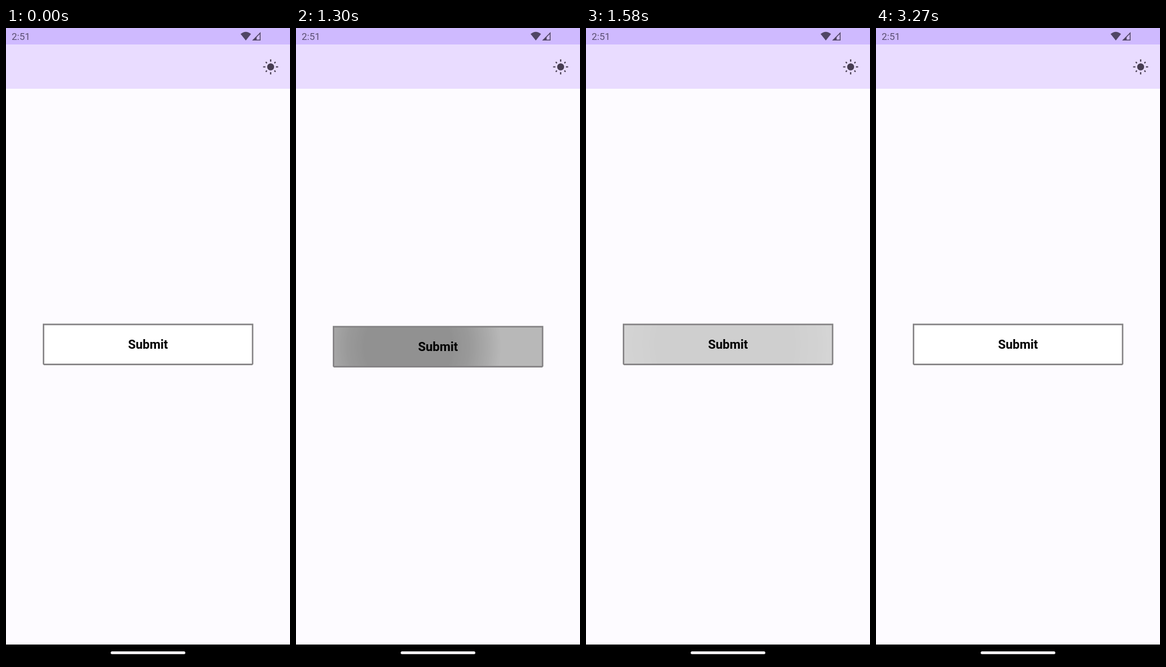
Write an HTML page that moves like this. It is 502 px wide and 1115 px high and loops after 3330 ms.

```html
<!DOCTYPE html>
<html lang="en">
<head>
<meta charset="utf-8">
<title>Submit button</title>
<style>
  html, body { margin: 0; width: 100%; height: 100%; overflow: hidden; background: #fdfbff; }
  svg { display: block; width: 502px; height: 1115px; font-family: Roboto, sans-serif; }
  .button, .ink, .ripple { animation: 3330ms linear infinite; }
  .button { animation-name: press; }
  .ink { animation-name: fade; }
  .ripple { animation-name: spread; }

  /* Touch down at 1190 ms, release at 1390 ms */
  @keyframes press {
    0%, 35.74% { transform: translateY(0); }
    37.84%, 41.74% { transform: translateY(4px); }
    43.54% { transform: translateY(3px); }
    46.85%, 100% { transform: translateY(0); }
  }
  @keyframes fade {
    0%, 35.74% { opacity: 0; }
    37.84%, 41.74% { opacity: 1; }
    43.54% { opacity: .82; }
    47.45% { opacity: .44; }
    50.75%, 100% { opacity: 0; }
  }
  @keyframes spread {
    0%, 35.74% { transform: translate(180px, 557px) scale(50); }
    39.04% { transform: translate(198px, 557px) scale(165); }
    43.24%, 100% { transform: translate(246px, 557px) scale(260); }
  }
</style>
</head>
<body>
<svg viewBox="0 0 502 1115">
  <defs>
    <radialGradient id="glow">
      <stop offset=".48" stop-opacity=".21"/>
      <stop offset=".65" stop-opacity=".17"/>
      <stop offset=".85" stop-opacity=".08"/>
      <stop offset="1" stop-opacity="0"/>
    </radialGradient>
    <clipPath id="face"><rect x="66" y="522" width="370" height="71"/></clipPath>
  </defs>

  <rect width="502" height="1115" fill="#fdfbff"/>
  <rect width="502" height="107" fill="#e9dcff"/>
  <rect width="502" height="29" fill="#cfbaff"/>

  <text x="10" y="21.3" font-size="17" fill="#5a4e70">2:51</text>
  <g fill="#514664">
    <path d="M414.7 10.6Q423.9 3 433.1 10.6L423.9 22Z"/>
    <path d="M435 22L450 7V22ZM443 20.5H448.5V10.7L443 16.2Z" fill-rule="evenodd"/>
  </g>

  <g transform="translate(467.8 68.5)" fill="#473d51" stroke="#473d51" stroke-width="2.2">
    <circle r="6.2" stroke="none"/>
    <path d="M0-13.3V-9.2M0 9.2V13.3M-13.3 0H-9.2M9.2 0H13.3"/>
    <path d="M0-12.2V-9.3M0 9.3V12.2M-12.2 0H-9.3M9.3 0H12.2" transform="rotate(45)"/>
  </g>

  <g class="button">
    <rect x="66" y="522" width="370" height="71" fill="#fff"/>
    <g clip-path="url(#face)">
      <g class="ink">
        <rect x="66" y="522" width="370" height="71" fill-opacity=".28"/>
        <circle class="ripple" r="1" fill="url(#glow)"/>
      </g>
    </g>
    <path d="M65 520.8H437.2V592L435.2 594H67L65 592ZM67.6 523.5V591.3H434.6V523.5Z"
          fill="#858385" fill-rule="evenodd"/>
    <text x="251" y="565" font-size="22" font-weight="700" text-anchor="middle">Submit</text>
  </g>

  <rect y="1086" width="502" height="29"/>
  <rect x="185" y="1098" width="132" height="5" rx="2.5" fill="#f1eff1"/>
</svg>
</body>
</html>
```
